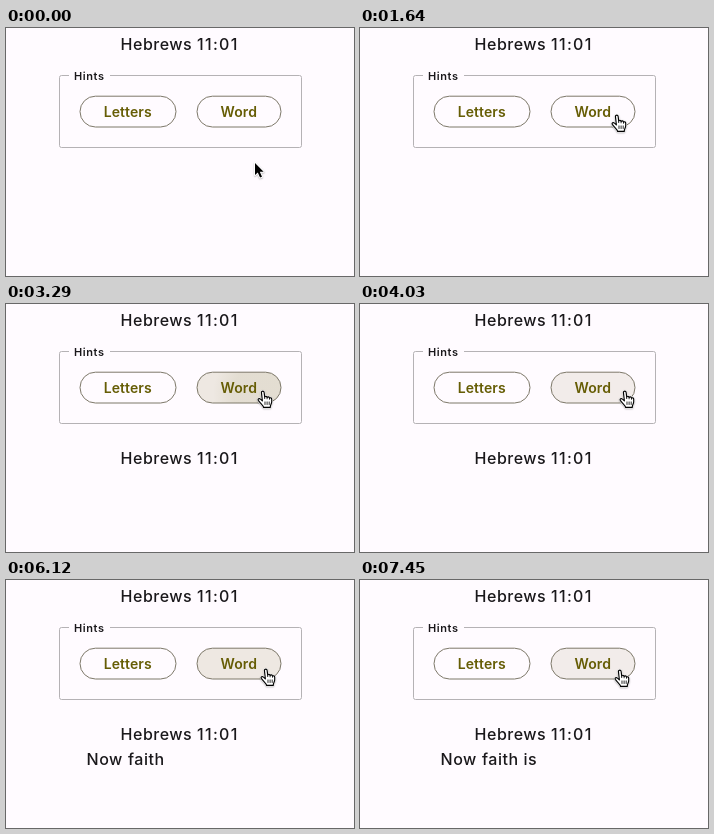
Write an HTML page with a canvas that moves like this. It is 348x248 px and loops after 8 s.

```html
<!DOCTYPE html>
<html lang="en">
<head>
<meta charset="utf-8">
<title>Verse hints</title>
<style>
  html, body { margin: 0; width: 100%; height: 100%; overflow: hidden; background: #fffbff; }
  canvas { display: block; width: 348px; height: 248px; }
</style>
</head>
<body>
<canvas id="stage"></canvas>
<script>
const W = 348, H = 248, LOOP = 8000;
const INK = '#1a181b', OLIVE = '#665d05', OUTLINE = '#7d7869', PAPER = '#fffbff';
const HOVER = '#f2ecea', WARM = '#eee8e2', PRESSED = '#ebe8df';

const canvas = document.getElementById('stage');
const ctx = canvas.getContext('2d');
const dpr = window.devicePixelRatio || 1;
canvas.width = W * dpr;
canvas.height = H * dpr;

// Cursor steps: time, shape, left, top
const cursorSteps = [
  [0, 'arrow', 249, 135], [150, 'arrow', 249, 129], [300, 'arrow', 252, 111],
  [440, 'hand', 250, 89], [590, 'hand', 251, 87],
  [3580, 'hand', 253, 87], [3730, 'hand', 256, 87], [3880, 'hand', 258, 87], [4030, 'hand', 259, 87],
  [5220, 'hand', 257, 88], [5370, 'hand', 254, 89], [7300, 'hand', 254, 90]
];

// Button steps: time, fill, ripple radius
const fillSteps = [
  [0, PAPER, 0], [1790, HOVER, 24], [1940, HOVER, 50], [2240, PRESSED, 0],
  [3290, WARM, 50], [3580, PRESSED, 0], [3730, WARM, 0], [3880, HOVER, 0],
  [4480, HOVER, 28], [4630, HOVER, 50], [4780, WARM, 0], [4920, HOVER, 0],
  [5820, HOVER, 50], [6120, WARM, 0],
  [6870, HOVER, 28], [7010, HOVER, 50], [7300, WARM, 0], [7450, HOVER, 0]
];

// Revealed words: time, text, x, baseline, letter spacing
const words = [
  [1790, 'Hebrews', 114.6, 160], [3290, '11:01', 190.9, 160, 1.35],
  [4480, 'Now', 80.6, 185], [5820, 'faith', 122, 185], [6870, 'is', 163.4, 185]
];

const handShape = new Path2D(
  'M4.5 2.2 C4.5 .5 7 .5 7.1 2.2 L7.6 6.4 C8 5.5 9.7 5.6 9.9 6.8 ' +
  'C10.4 6 12 6.2 12.2 7.5 C12.8 6.9 14.3 7.2 14.3 8.7 V11 ' +
  'C14.3 13 12.9 13.8 12.9 16.4 H6.6 C6.4 14.6 3.6 12.8 1.5 9.7 ' +
  'C.8 8.4 2.3 7.4 3.6 8.5 L5.4 10.2 Z');
const handLines = new Path2D('M7.6 6.4 V8.4 M9.9 6.8 V8.6 M12.2 7.5 V9 M7.9 10.8 V14 M9.9 10.8 V14 M11.9 10.8 V14');
const arrowShape = new Path2D('M0 0 V12 L2.8 9.4 L5 14.6 L7 13.8 L4.8 8.8 H8.6 Z');

const stepAt = (steps, t) => steps.findLast(s => s[0] <= t);

function text(str, x, y, size, weight, spacing, color) {
  ctx.font = `${weight} ${size}px Inter, sans-serif`;
  ctx.letterSpacing = spacing + 'px';
  ctx.fillStyle = color;
  ctx.fillText(str, x, y);
}

const body = (str, x, y, spacing = 0.5) => text(str, x, y, 16, 450, spacing, INK);

function fieldset() {
  ctx.strokeStyle = '#b5b2b5';
  ctx.lineWidth = 1;
  ctx.beginPath();
  ctx.roundRect(53.5, 47.5, 242, 72, 2);
  ctx.stroke();
  ctx.fillStyle = PAPER;
  ctx.fillRect(63, 46, 41, 3);
  text('Hints', 68, 52, 11, 600, 0.6, INK);
}

function button(label, x, width, textX, fill, radius, cx, cy) {
  const pill = new Path2D();
  pill.roundRect(x, 68.2, width, 30.8, 15.4);
  ctx.fillStyle = fill;
  ctx.fill(pill);
  if (radius) {
    ctx.save();
    ctx.clip(pill);
    const glow = ctx.createRadialGradient(cx, cy, radius * 0.6, cx, cy, radius);
    glow.addColorStop(0, 'rgba(102,95,20,.08)');
    glow.addColorStop(1, 'rgba(102,95,20,0)');
    ctx.fillStyle = glow;
    ctx.fillRect(x, 67, width, 33);
    ctx.restore();
  }
  ctx.strokeStyle = OUTLINE;
  ctx.lineWidth = 1;
  ctx.stroke(pill);
  text(label, textX, 88.5, 14, 600, 0.1, OLIVE);
}

function cursor(shape, x, y) {
  const isHand = shape === 'hand';
  const outline = isHand ? handShape : arrowShape;
  ctx.save();
  ctx.translate(x, y);
  if (isHand) {
    ctx.translate(-0.3, -0.8);
    ctx.scale(1.05, 1.05);
  }
  ctx.lineJoin = 'round';
  ctx.save();
  ctx.shadowColor = 'rgba(0,0,0,.3)';
  ctx.shadowBlur = 1.5 * dpr;
  ctx.shadowOffsetY = 0.7 * dpr;
  ctx.strokeStyle = '#fff';
  ctx.lineWidth = 2;
  ctx.stroke(outline);
  ctx.restore();
  ctx.fillStyle = isHand ? '#fff' : '#000';
  ctx.fill(outline);
  if (isHand) {
    ctx.strokeStyle = '#000';
    ctx.lineWidth = 1.1;
    ctx.stroke(handShape);
    ctx.lineWidth = 0.8;
    ctx.stroke(handLines);
  }
  ctx.restore();
}

function draw(t) {
  ctx.setTransform(dpr, 0, 0, dpr, 0, 0);
  ctx.fillStyle = PAPER;
  ctx.fillRect(0, 0, W, H);
  body('Hebrews', 114.6, 22);
  body('11:01', 190.9, 22, 1.35);
  fieldset();

  const [, shape, x, y] = stepAt(cursorSteps, t);
  const [, fill, radius] = stepAt(fillSteps, t);
  button('Letters', 74, 96, 97.7, PAPER, 0);
  button('Word', 191, 84, 214.5, fill, radius, x + 6, y + 2);

  for (const [start, ...word] of words) if (t >= start) body(...word);
  cursor(shape, x, y);
}

const origin = performance.now();
function tick() {
  draw((performance.now() - origin) % LOOP);
  requestAnimationFrame(tick);
}
tick();
</script>
</body>
</html>
```
